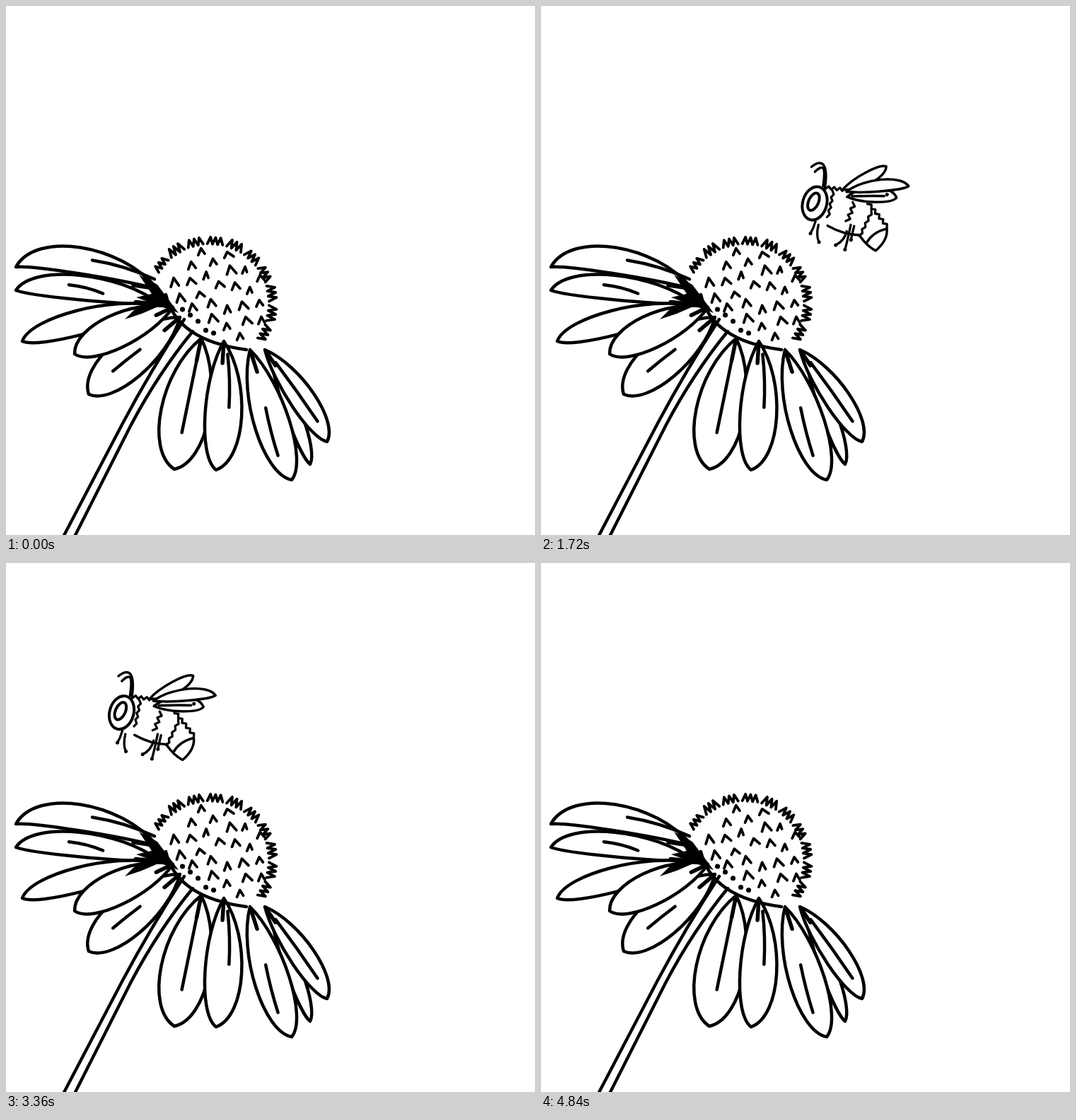
These frames come from a looping animation (748 px wide and 748 px high, 4.92 s). An HTML page with a canvas:

```html
<!DOCTYPE html>
<html lang="en">
<head>
<meta charset="utf-8">
<title>Bee and coneflower</title>
<style>
html, body { margin: 0; width: 100%; height: 100%; overflow: hidden; background: #fff; }
canvas { display: block; width: 748px; height: 748px; }
</style>
</head>
<body>
<canvas id="stage" width="748" height="748"></canvas>
<script>
const ctx = document.getElementById('stage').getContext('2d');
const LOOP = 4920, STEP = 40;

function seeded(seed) {
  return () => (seed = seed * 16807 % 2147483647) / 2147483647;
}

function stroke(path, width) {
  ctx.lineWidth = width;
  ctx.stroke(new Path2D(path));
}

function shape(path, width) {
  ctx.fill(new Path2D(path));
  stroke(path, width);
}

function dot(x, y, r) {
  stroke(`M${x} ${y}h.1`, r * 2);
}

// Coordinates measured along the axis from base to tip and sideways from it.
function axis(x0, y0, x1, y1) {
  const dx = x1 - x0, dy = y1 - y0, len = Math.hypot(dx, dy);
  return (u, side) => `${x0 + dx * u - dy / len * side} ${y0 + dy * u + dx / len * side}`;
}

// A leaf shape with its own bulge on each side of the axis.
function petal(base, tip, bulgeA, bulgeB, width) {
  const at = axis(...base, ...tip);
  shape(`M${at(0, 0)}C${at(.3, bulgeA)} ${at(.9, bulgeA)} ${at(1, 0)}` +
    `C${at(.9, bulgeB)} ${at(.3, bulgeB)} ${at(0, 0)}`, width);
  return (from, to, side, weight = width) =>
    stroke(`M${at(from, side / 2)}Q${at((from + to) / 2, side)} ${at(to, side)}`, weight);
}

function zigzag(x0, y0, x1, y1, teeth, height, width) {
  const at = axis(x0, y0, x1, y1);
  let path = `M${at(0, 0)}`;
  for (let i = 1; i <= teeth * 2; i++) path += `L${at(i / teeth / 2, i % 2 ? -height : 0)}`;
  stroke(path, width);
}

function flowerPetal(base, tip, bulgeA, bulgeB, vein) {
  const line = petal(base, tip, bulgeA, bulgeB, 4.5);
  line(.02, .17, 0, 5.5);
  if (vein) line(...vein);
}

function drawPetals() {
  flowerPetal([214, 400], [14, 369], 55, 6, [.03, .48, 26]);
  flowerPetal([218, 422], [14, 402], 40, -6, [.4, .64, 15]);
  flowerPetal([216, 424], [23, 474], 30, -16);
  flowerPetal([246, 440], [117, 549], 42, -35, [.43, .72, 3]);
  shape('M252 443Q205 515 165 590L76 760H92L177 592Q215 520 264 460', 4.4);
  flowerPetal([236, 426], [97, 492], 36, -27);
  flowerPetal([276, 470], [238, 655], 47, -44, [.05, .72, 0]);
  flowerPetal([308, 474], [297, 656], 27, -42, [.1, .51, -13]);
  flowerPetal([375, 500], [430, 648], 10, -18);
  flowerPetal([366, 486], [454, 616], 17, -30, [.15, .8, -5]);
  flowerPetal([345, 486], [404, 670], 36, -30, [.44, .8, 8]);
}

function drawCone() {
  const rand = seeded(7), cx = 288, cy = 420, groups = 10;
  const onRim = a => [cx + 84 * Math.cos(a), cy + 84 * Math.sin(a)];

  for (let i = 0; i < groups; i++) {
    const a = -2.6 + i * .33;
    zigzag(...onRim(a), ...onRim(a + .26), 3, 9 + rand() * 3, 3.8);
  }

  // Small carets in a sunflower spiral, kept above the lower edge.
  for (let i = 1; i < 30; i++) {
    const r = 13 * Math.sqrt(i), a = i * 2.4;
    const x = 299 + r * Math.cos(a), y = 412 + r * Math.sin(a);
    if (y > 400 + (x - 222) * .75) continue;
    const lean = rand() * 8 - 2, tall = 8 + rand() * 5;
    stroke(`M${x - 4} ${y + 5}L${x} ${y + 5 - tall}L${x + 4 + lean} ${y + 3}`, 3.8);
  }

  stroke('M226 408Q241 473 340 486', 4.5);
  for (let u = .25; u < .7; u += .1) dot(222 + u * 110, 408 + u * 95 - rand() * 8, 3.5);
  ctx.fillStyle = '#000';
  ctx.fill(new Path2D('M188 380L214 394L244 434L184 412L206 407ZM168 443L184 427L229 419L192 435Z'));
  ctx.fillStyle = '#fff';
}

function drawBee() {
  stroke('M559 209C558 175 548 168 535 183M556 207C555 178 551 176 541 189', 3.4);
  ctx.lineWidth = 4;
  for (const [x, y, rx, ry, tilt] of [[548.5, 233, 17, 24, .1], [546.5, 231, 7, 13, .25]]) {
    ctx.beginPath();
    ctx.ellipse(x, y, rx, ry, tilt, 0, Math.PI * 2);
    ctx.stroke();
  }

  zigzag(560, 210, 584, 209, 3, 4, 3.2);
  zigzag(570, 211, 569, 249, 4, 3, 3.2);
  zigzag(601, 222, 596, 250, 3, 5, 3.2);
  zigzag(622, 221, 655, 250, 5, 4, 3.2);
  zigzag(629, 229, 618, 267, 4, 3, 3.2);
  stroke('M572 261Q598 270 620 266M655 250Q660 266 645 284Q632 280 619 267M630 276Q636 259 654 251', 3.5);

  for (const [hipX, hipY, footX, footY] of [
    [554, 258, 550, 276], [559, 262, 564, 286], [600, 264, 588, 286], [604, 254, 602, 290], [609, 255, 608, 275]
  ]) {
    stroke(`M${hipX} ${hipY}Q${hipX - 1} ${footY - 8} ${footX} ${footY}`, 3.3);
    dot(footX, footY, 2.5);
  }

  petal([584, 207], [639, 164], 14, -8, 3.5);
  petal([592, 216], [661, 205], 9, -18, 3.5)(.1, .75, -2);
  petal([590, 209], [675, 186], 5, -17, 3.5);
  dot(647, 203, 2.5);
}

// time, x, y
const flight = [
  [0, 820, 211], [640, 672, 211], [960, 599, 220], [1720, 439, 275], [1960, 402, 321], [2040, 402, 321],
  [2520, 347, 270.5], [3360, 215.5, 207.5], [4200, 67.5, 135], [4480, 12, 115.5], [4840, -82, 115.5], [LOOP, -100, 115.5]
];

const ramp = (t, from, to) => Math.min(1, Math.max(0, (t - from) / (to - from)));

function positionAt(t) {
  const i = flight.findIndex(key => key[0] > t);
  const [t0, x0, y0] = flight[i - 1], [t1, x1, y1] = flight[i];
  const u = ramp(t, t0, t1);
  return [x0 + (x1 - x0) * u, y0 + (y1 - y0) * u];
}

function tiltAt(t) {
  const steps = ramp(t, 960, 1280) + ramp(t, 1720, 2240) - ramp(t, 2800, 3120) - ramp(t, 3920, 4200);
  return steps * Math.PI / 18;
}

function frame(now) {
  const t = Math.floor(now % LOOP / STEP) * STEP;
  ctx.fillStyle = '#fff';
  ctx.strokeStyle = '#000';
  ctx.lineCap = ctx.lineJoin = 'round';
  ctx.fillRect(0, 0, 748, 748);
  drawPetals();
  drawCone();
  ctx.save();
  ctx.translate(...positionAt(t));
  ctx.rotate(tiltAt(t));
  ctx.translate(-599, -220);
  drawBee();
  ctx.restore();
  requestAnimationFrame(frame);
}

requestAnimationFrame(frame);
</script>
</body>
</html>
```
